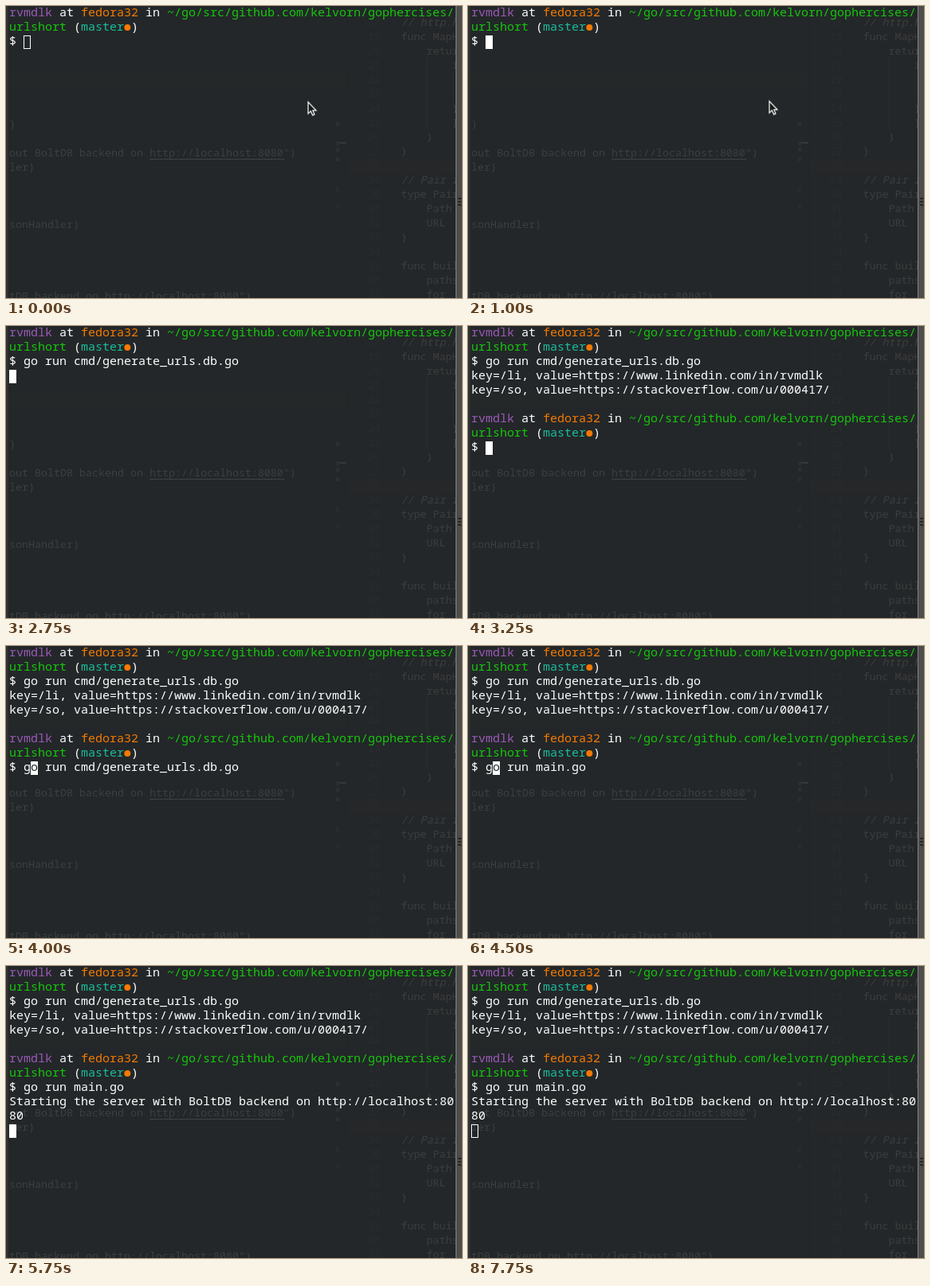
Animation of 572x367 px, one loop 8 s. Source, as an HTML page:

```html
<!DOCTYPE html>
<html lang="en">
<head>
<meta charset="utf-8">
<title>Terminal session</title>
<style>
  html, body { margin: 0; width: 100%; height: 100%; overflow: hidden; background: #232729; }
  svg { display: block; }
  text { font-family: "Noto Sans Mono", "DejaVu Sans Mono", monospace; white-space: pre; }
  .term text { font-size: 15px; }
  .ghost text { font-size: 13.333px; }
</style>
</head>
<body>
<svg id="stage" width="572" height="367" viewBox="0 0 572 367">
  <rect width="572" height="367" fill="#232729"/>
  <rect y="84" width="427" height="19" fill="#252829"/>
  <rect x="428" y="192" width="136" height="18" fill="#262728"/>
  <path d="M528.5 65V155M560.5 83V119" stroke="#2a2d2f"/>
  <g id="ghost" class="ghost"></g>
  <path d="M427.5 0V367" stroke="#212527"/>
  <path d="M414 172H427" stroke="#36393b" stroke-width="2"/>
  <path d="M180 192.5H349" stroke="#3f4345"/>
  <g id="specks" fill="#2b2f31"></g>
  <rect width="3" height="367" fill="#303232"/>
  <rect x="564" width="1" height="367" fill="#858585"/>
  <rect x="565" width="7" height="367" fill="#4d4d4c"/>
  <path d="M567 242H571M567 246H571M567 250H571" stroke="#232526" stroke-width="2"/>
  <g id="term" class="term"></g>
</svg>
<script>
const LOOP = 8000, COL = 9, ROW = 18;
const WHITE = '#fff', DARK = '#232729', PURPLE = '#9b59b6', ORANGE = '#f57900',
      GREEN = '#16c60c', TEAL = '#1abc9c';
const $ = id => document.getElementById(id);
const term = $('term'), ghost = $('ghost'), specks = $('specks');

function add(parent, tag, attrs, content) {
  const el = document.createElementNS('http://www.w3.org/2000/svg', tag);
  for (const k in attrs) el.setAttribute(k, attrs[k]);
  if (content) el.textContent = content;
  parent.append(el);
  return el;
}

// Visible from one time to another, with hard cuts.
function during(el, from, to) {
  if (from === 0 && to === LOOP) return;
  const steps = [[0, from ? 0 : 1]];
  if (from) steps.push([from, 1]);
  if (to < LOOP) steps.push([to, 0]);
  steps.push([LOOP, steps[steps.length - 1][1]]);
  el.animate(steps.map(([t, opacity]) => ({ offset: t / LOOP, opacity, easing: 'step-end' })),
    { duration: LOOP, iterations: Infinity });
}

const cellX = col => 4 + col * COL;
const cellY = row => 1 + row * ROW;

function print(row, col, str, from = 0, to = LOOP, fill = WHITE) {
  during(add(term, 'text', { x: cellX(col), y: cellY(row) + 12, fill }, str), from, to);
}

function block(row, col, from, to) {
  during(add(term, 'rect', { x: cellX(col), y: cellY(row), width: 9, height: 17, fill: WHITE }), from, to);
}

function hollow(row, col, from, to) {
  during(add(term, 'rect', { x: cellX(col) + .5, y: cellY(row) + .5, width: 8, height: 16,
    fill: 'none', stroke: WHITE }), from, to);
}

function prompt(row, from) {
  const put = (r, c, s, fill) => print(r, c, s, from, LOOP, fill);
  put(row, 0, 'rvmdlk', PURPLE);
  put(row, 7, 'at');
  put(row, 10, 'fedora32', ORANGE);
  put(row, 19, 'in');
  put(row, 22, '~/go/src/github.com/kelvorn/gophercises/', GREEN);
  put(row + 1, 0, 'urlshort', GREEN);
  put(row + 1, 9, '(');
  put(row + 1, 10, 'master', TEAL);
  during(add(term, 'circle', { cx: cellX(16) + 4.3, cy: cellY(row + 1) + 8, r: 4, fill: ORANGE }), from, LOOP);
  put(row + 1, 17, ')');
  put(row + 2, 0, '$');
}

// Type "g", recall a history entry, swap it for another, press enter.
function command(row, first, second, typed, recalled, swapped, entered) {
  print(row, 2, 'g', typed);
  block(row, 3, typed, entered);
  print(row, 3, 'o', recalled, entered, DARK);
  print(row, 3, 'o', entered);
  print(row, 5, 'run', recalled);
  print(row, 9, first, recalled, swapped);
  print(row, 9, second, swapped);
}

// Editor showing through the window
const code = (x, y, str, fill, style = 'normal') =>
  add(ghost, 'text', { x, y: y + 4.5, fill, 'font-style': style }, str);

[[148, ')'], [184, 'out BoltDB backend on http://localhost:8080")'], [202, 'ler)'],
 [274, 'sonHandler)'], [364, 'tDB backend on http://localhost:8080")']]
  .forEach(([y, s]) => code(4, y, s, '#3b3f41'));

['// http.h', 'func MapH', '    retur', '        i', '', '', '        }', '        }', '    }', '}',
 '', '// Pair r', 'type Pair', '    Path', '    URL', '}', '', 'func buil', '    paths', '    for']
  .forEach((s, i) => {
    const y = 20 + i * ROW;
    code(454, y, String(18 + i), '#292d2f');
    code(495.5, y, s, '#3e3d3e', s.startsWith('//') ? 'italic' : 'normal');
  });

[148, 172, 180, 192, 230, 252].forEach((y, i) =>
  add(specks, 'rect', { x: 414, y: y - 2, width: 4, height: 5, opacity: i < 4 ? 1 : .6 }));

// Terminal
prompt(0, 0);
hollow(2, 2, 0, 750);
block(2, 2, 750, 1250);
command(2, 'main.go', 'cmd/generate_urls.db.go', 1250, 1750, 2500, 2750);
block(3, 0, 2750, 3250);

print(3, 0, 'key=/li, value=https://www.linkedin.com/in/rvmdlk', 3250);
print(4, 0, 'key=/so, value=https://stackoverflow.com/u/000417/', 3250);
prompt(6, 3250);
block(8, 2, 3250, 3500);
command(8, 'cmd/generate_urls.db.go', 'main.go', 3500, 4000, 4500, 5250);
block(9, 0, 5250, 5750);

print(9, 0, 'Starting the server with BoltDB backend on http://localhost:80', 5750);
print(10, 0, '80', 5750);
block(11, 0, 5750, 7750);
hollow(11, 0, 7750, LOOP);

// Mouse pointer: a small nudge, then hidden by typing
[[379, 120.6, 0, 1000], [378, 119.6, 1000, 1250]].forEach(([x, y, from, to]) =>
  during(add(term, 'path', { d: 'M0 0V14.6L3.3 11.6L5.6 16.6L8 15.6L5.8 10.7H10Z',
    transform: `translate(${x} ${y})`, fill: '#17191a', stroke: WHITE, 'stroke-width': 1.2 }), from, to));
</script>
</body>
</html>
```
